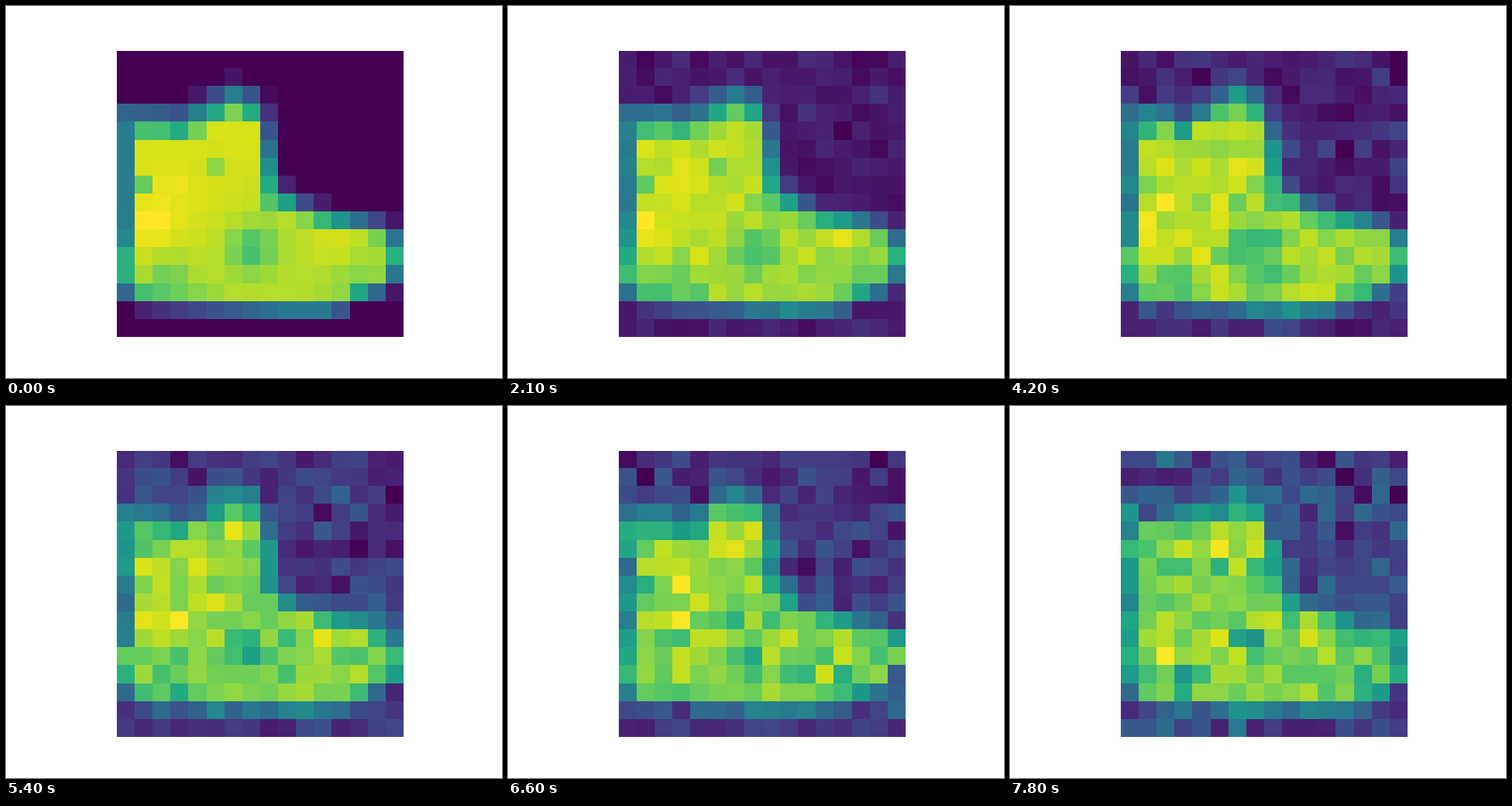
These frames come from a looping animation (640x480 px, 8 s). A matplotlib script:

```python
import numpy as np
import matplotlib.pyplot as plt
from matplotlib.animation import FuncAnimation

SIZE = 16
TICK_MS = 100
TICKS_PER_STEP = 3
TICKS = 80
NOISE_PER_STEP = 0.0046

ROWS, COLS = np.mgrid[:SIZE, :SIZE]


def spot(row, col, radius, amount):
    """Soft round light (positive) or shade (negative) on the leather."""
    distance = np.hypot(ROWS - row, COLS - col) / radius
    return amount * np.exp(-distance ** 2)


def profile(*points):
    """Height in every column of a line through a few (column, height) points."""
    return np.interp(np.arange(SIZE), *zip(*points))


def make_leather():
    # Slightly darker from the ankle towards the toe and sole
    base = .935 - .05 * np.clip((ROWS + COLS - 12) / 6, 0, 1)
    crease = spot(10.6, 7, 1.3, -.2)
    seam = spot(6, 5, .6, -.11) + spot(7, 1, .5, -.18)
    worn = spot(12.4, 2.3, 1.4, -.15) + spot(12.5, 13, 1.8, -.08)
    shine = spot(9, 1.5, 1.2, .07) + spot(7, 2.5, .8, .04) + spot(10.4, 11.8, 1.4, .06)
    return base + crease + seam + worn + shine


def make_boot():
    # The steeper the upper outline, the softer its edge
    top = profile((0, 2.2), (3, 2.3), (6, .85), (7, 1.26), (8, 1.8),
                  (9, 6.8), (10, 7.6), (15, 8.9))
    steepness = np.diff(top, append=top[-1])
    hardness = np.where(COLS < 8, .4, .6) / np.hypot(1, steepness)
    upper = (ROWS - top) * hardness

    sole = profile((0, -.27), (1, .1), (9, .4), (11.5, .4), (15, -.54))
    lower = sole + (14 - ROWS) * .6

    boot = np.minimum(make_leather(), np.minimum(upper, lower))
    heel = .42 + spot(11.5, 0, 1.2, .25)
    toe = .63 - .24 * abs(ROWS - 11)
    boot = np.where(COLS == 0, np.minimum(boot, heel), boot)
    boot = np.where(COLS == SIZE - 1, np.minimum(boot, toe), boot)
    return np.clip(boot, 0, 1)


BOOT = make_boot()


def noisy_boot(step):
    rng = np.random.default_rng(100 + step)
    noise = np.clip(rng.standard_normal(BOOT.shape), -2.6, 2.6)
    return BOOT + NOISE_PER_STEP * step * noise


fig, ax = plt.subplots(figsize=(6.4, 4.8), dpi=100)
ax.axis("off")
image = ax.imshow(BOOT, cmap="viridis")


def update(tick):
    image.set_data(noisy_boot(tick // TICKS_PER_STEP))
    image.autoscale()
    return [image]


anim = FuncAnimation(fig, update, frames=TICKS, interval=TICK_MS,
                     repeat=True, repeat_delay=0)
plt.show()
```
